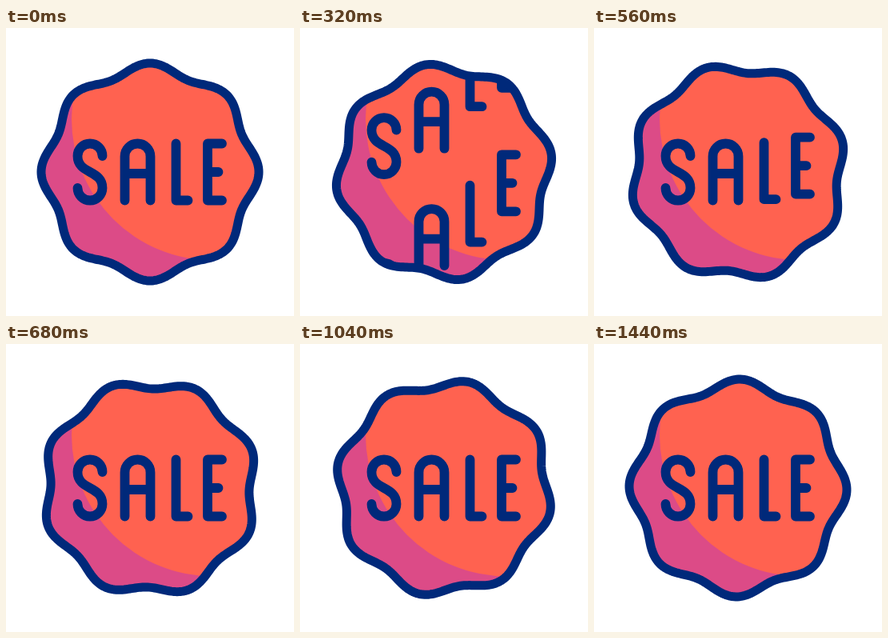
Animation of 360x360 px, one loop 1.48 s. Source, as an HTML page with a canvas:

```html
<!DOCTYPE html>
<html lang="en">
<head>
<meta charset="utf-8">
<title>Sale badge</title>
<style>
  html, body { margin: 0; width: 100%; height: 100%; overflow: hidden; background: #fff; }
  canvas { display: block; width: 360px; height: 360px; }
</style>
</head>
<body>
<canvas id="stage" width="360" height="360"></canvas>
<script>
const ctx = document.getElementById('stage').getContext('2d');
const LOOP = 1480, STEP = 40;
const NAVY = '#00297a', CORAL = '#ff6250', PINK = '#dc4b87';
const CENTER = 180, LOBES = 8, RADIUS = 130, WAVE = 6;

// Each letter leaves downwards while its copy drops in from above; spans are [start, end] in ms.
const TRAVEL = 180;
const letters = [
  { path: new Path2D('M120.5 160A15.5 15.5 0 0 0 89.5 160C89.5 183 120.5 177 120.5 200A15.5 15.5 0 0 1 89.5 200'), out: [-6, 454], in: [40, 440] },
  { path: new Path2D('M148.5 215.5V160.5A16 16 0 0 1 180.5 160.5V215.5M148.5 182H180.5'), out: [101, 561], in: [35, 530] },
  { path: new Path2D('M212.5 144.5V215.5H227.5'), out: [145, 605], in: [128, 588] },
  { path: new Path2D('M270 144.5H252V215.5H270M252 180H265.5'), out: [230, 690], in: [168, 628] }
];

function progress(time, [start, end]) {
  if (time === 0) return 0;
  const p = Math.min(1, Math.max(0, (time - start) / (end - start)));
  return p < 0.5 ? 2 * p * p : 1 - 2 * (1 - p) * (1 - p);
}

function badgePath(turn) {
  const path = new Path2D();
  for (let deg = 0; deg < 360; deg++) {
    const a = deg * Math.PI / 180;
    const r = RADIUS + WAVE * Math.cos(LOBES * a);
    path.lineTo(CENTER + r * Math.cos(a + turn), CENTER + r * Math.sin(a + turn));
  }
  path.closePath();
  return path;
}

function drawLetter(path, dy) {
  ctx.save();
  ctx.translate(0, dy);
  ctx.stroke(path);
  ctx.restore();
}

function draw(time) {
  const badge = badgePath(-Math.PI / 4 * time / LOOP);
  ctx.fillStyle = '#fff';
  ctx.fillRect(0, 0, 360, 360);
  ctx.strokeStyle = NAVY;
  ctx.lineCap = ctx.lineJoin = 'round';

  ctx.save();
  ctx.clip(badge);
  ctx.fillStyle = PINK;
  ctx.fillRect(0, 0, 360, 360);
  ctx.fillStyle = CORAL;
  ctx.beginPath();
  ctx.arc(259, 113.5, 177, 0, 2 * Math.PI);
  ctx.fill();
  ctx.lineWidth = 11.8;
  for (const letter of letters) {
    drawLetter(letter.path, TRAVEL * progress(time, letter.out));
    drawLetter(letter.path, TRAVEL * (progress(time, letter.in) - 1));
  }
  ctx.restore();

  ctx.lineWidth = 11;
  ctx.stroke(badge);
}

const begin = performance.now();
function tick() {
  const time = (performance.now() - begin) % LOOP;
  draw(Math.floor(time / STEP) * STEP);
  requestAnimationFrame(tick);
}
tick();
</script>
</body>
</html>
```
